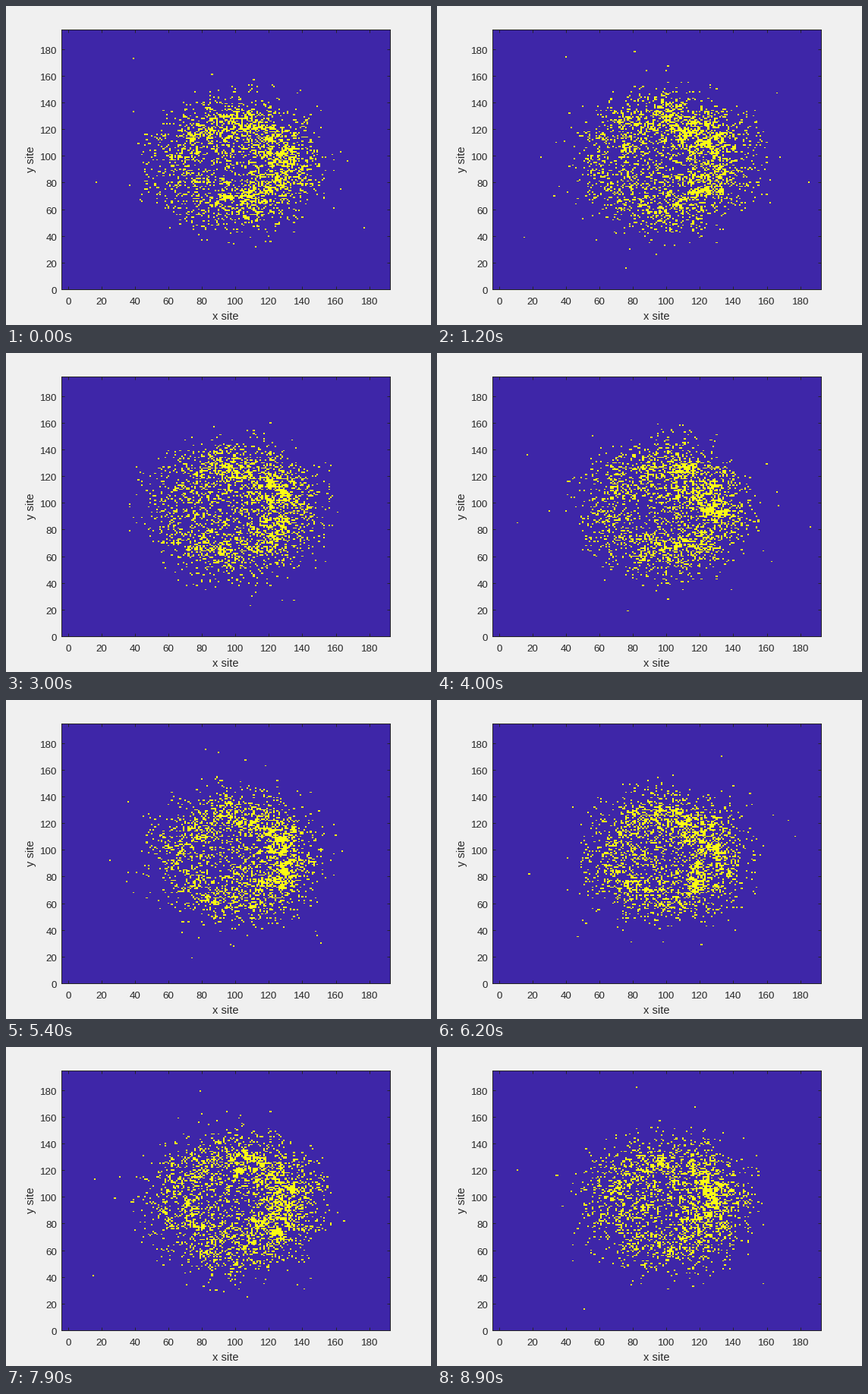
Animation of 560x420 px, one loop 9.1 s. Source, as a matplotlib script:

```python
import numpy as np
import matplotlib.pyplot as plt
from matplotlib.animation import FuncAnimation
from matplotlib.colors import ListedColormap

W, H = 560, 420
LEFT, RIGHT, TOP, BOTTOM = 73, 506, 31, 373
X_LIM, Y_LIM = (-4, 192.4), (0, 194.6)
INK, BLUE, YELLOW = "#262626", "#3e26a8", "#f9fb15"
STEP, LOOP = 100, 9100

# Start time of each exposure in ms: a long first one, then two runs
STARTS = np.concatenate([[0], np.arange(1000, 6401, 200), np.arange(6900, 8901, 200)])

X0, NX, NY = -4, 197, 195
gx, gy = np.meshgrid(np.arange(NX) + X0, np.arange(NY))


def blur(field, passes=3):
    for _ in range(passes):
        for axis in (0, 1):
            field = (np.roll(field, 1, axis) + field + np.roll(field, -1, axis)) / 3
    return field / field.std()


def density(scale):
    """Chance that each site is lit: a soft disc with a brighter, lopsided ring."""
    dx, dy = (gx - 98) / scale, (gy - 94) / scale
    r = np.hypot(dx, dy)
    disc = 0.19 * np.exp(-(r / 51) ** 5)
    ring = 0.22 * np.exp(-((r - 31) / 12) ** 2)
    halo = 0.003 * np.exp(-(r / 72) ** 4)
    tilt = 1 + 0.35 * np.cos(np.arctan2(dy, dx) - 0.35) * np.minimum(r / 30, 1)
    return (disc + ring) * tilt + halo


def expose(seed):
    """One random shot of the cloud, with sites gathered in small clumps."""
    rng = np.random.default_rng(seed)
    p = density(rng.normal(1, 0.03))
    p = p * np.exp(0.35 * blur(rng.normal(size=p.shape)) - 0.06)
    return (rng.random(p.shape) < np.minimum(p, 0.9)).astype(int)


exposures = [expose(100 + k) for k in range(len(STARTS))]

plt.rcParams["font.family"] = "Liberation Sans"
fig = plt.figure(figsize=(W / 100, H / 100), dpi=100, facecolor="#f0f0f0")
ax = fig.add_axes([LEFT / W, 1 - BOTTOM / H, (RIGHT - LEFT) / W, (BOTTOM - TOP) / H],
                  facecolor=BLUE)


def px(n):
    """Pixels to points."""
    return n * 0.72


def label(x, y, text, size=13.33, **kw):
    fig.text(x / W, 1 - y / H, text, fontsize=px(size), color=INK, **kw)


image = ax.imshow(exposures[0], cmap=ListedColormap([BLUE, YELLOW]), vmin=0, vmax=1,
                  origin="lower", aspect="auto", interpolation="nearest",
                  extent=(X0 - 0.5, X0 + NX - 0.5, -0.5, NY - 0.5))
ticks = range(0, 181, 20)
ax.set(xlim=X_LIM, ylim=Y_LIM, xticks=ticks, yticks=ticks)
ax.tick_params(direction="in", top=True, right=True, labelbottom=False, labelleft=False,
               length=px(4.3), width=px(1), color=INK)
for spine in ax.spines.values():
    spine.set(linewidth=px(1), edgecolor=INK)

for v in ticks:
    tx = LEFT + (v - X_LIM[0]) / (X_LIM[1] - X_LIM[0]) * (RIGHT - LEFT)
    ty = BOTTOM - v / Y_LIM[1] * (BOTTOM - TOP)
    label(tx, 393, str(v), ha="center", va="baseline")
    label(67, ty + 6, str(v), ha="right", va="baseline")
label(289.5, 413, "x site", 14.67, ha="center", va="baseline")
label(40, 202, "y site", 14.67, ha="right", va="center", rotation=90)


def update(i):
    k = np.searchsorted(STARTS, i * STEP, side="right") - 1
    image.set_data(exposures[k])
    return [image]


anim = FuncAnimation(fig, update, frames=LOOP // STEP, interval=STEP,
                     repeat=True, repeat_delay=0)
plt.show()
```
